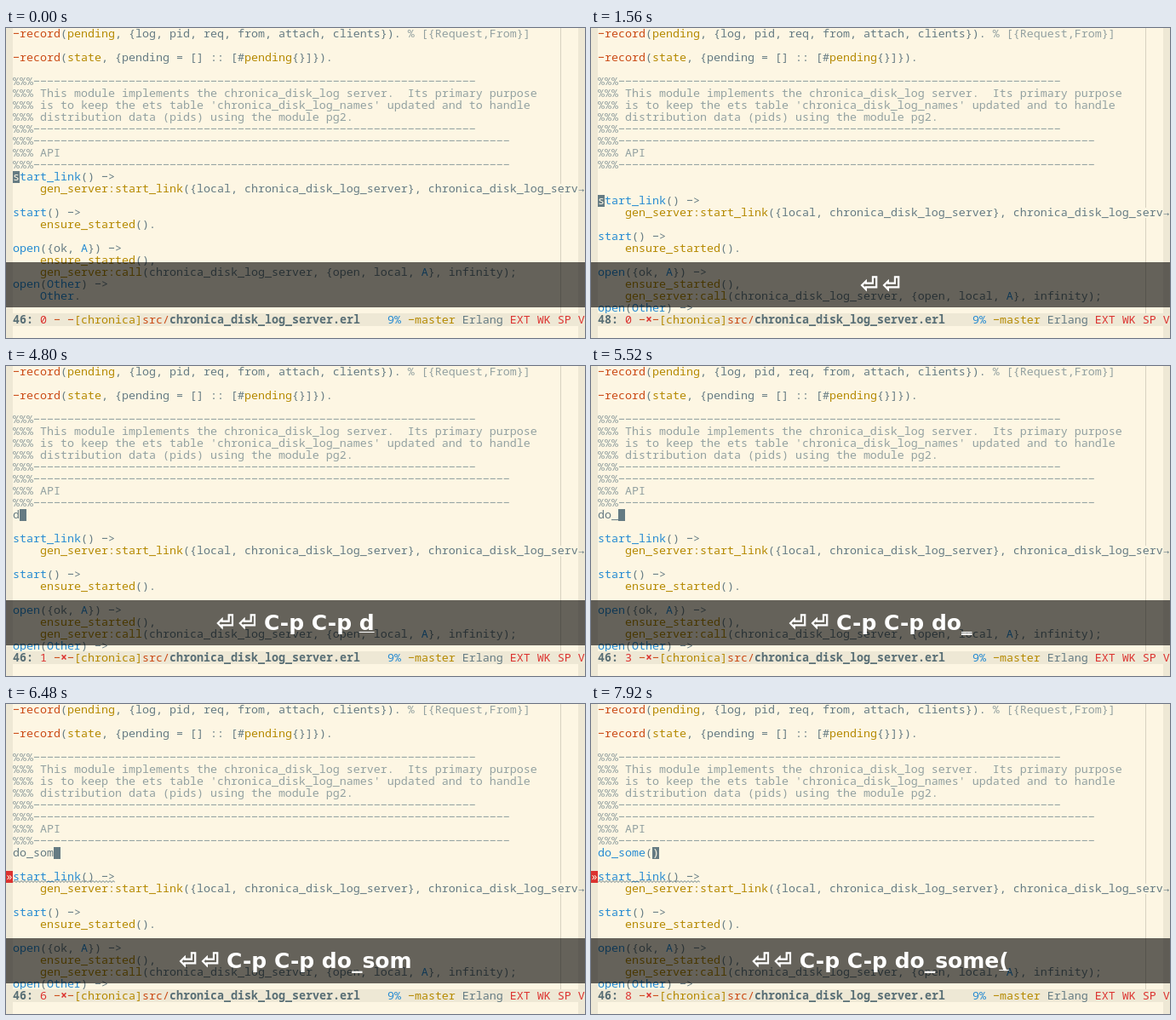
Recreate the animation shown at these times as an HTML page. Size 680 px wide and 364 px high, loop 8 s.

```html
<!DOCTYPE html>
<html lang="en">
<head>
<meta charset="utf-8">
<title>Editor</title>
<style>
html, body { margin: 0; width: 100%; height: 100%; overflow: hidden; background: #fdf6e3; }
#stage { position: relative; width: 680px; height: 364px; overflow: hidden; background: #fdf6e3; color: #657b83; }
#stage > * { position: absolute; margin: 0; }
#stage > pre, #cursor, #mark { font: 13.333px/14px "Noto Sans Mono", monospace; white-space: pre; }
#stage > pre { left: 8px; margin-top: -1px; z-index: 1; }
.fringe { top: 0; width: 8px; height: 364px; background: #eee8d5; }
#rule { left: 651px; top: 0; width: 1px; height: 336px; background: #d8d2c0; }
#head { top: 0; }
#typed { top: 168px; }
.wide { display: inline-block; height: 14px; vertical-align: top; background: linear-gradient(#0000 2px, #fdf6e3 2px); }
#stage > #cursor, #stage > #mark { width: 8px; height: 14px; line-height: 12px; color: #fdf6e3; z-index: 2; }
#cursor { background: #657b83; }
#mark { left: 0; top: 196px; background: #dc322f; }
#wave { left: 8px; top: 206px; z-index: 2; }
#stage > #mode { left: 0; top: 336px; width: 672px; height: 15px; padding-left: 8px; background: #eee8d5; z-index: 3; }
#keys { left: 0; top: 275px; width: 680px; height: 53px; z-index: 4; background: rgba(0, 0, 0, .6); color: #fff;
  font: bold 25px/53px "DejaVu Sans", sans-serif; text-align: center; white-space: pre; }
#keys i { font-style: normal; font-weight: normal; -webkit-text-stroke: 1px #fff; }
#keys u { text-decoration-thickness: 1px; text-underline-offset: 2px; text-decoration-skip-ink: none; }
.c { color: #93a1a1; }
.o { color: #cb4b16; }
.y { color: #b58900; }
.b { color: #268bd2; }
.r { color: #dc322f; }
.f { color: #586e75; }
</style>
</head>
<body>
<div id="stage">
  <div class="fringe" style="left:0"></div>
  <div class="fringe" style="left:672px"></div>
  <div id="rule"></div>
  <pre id="head"></pre>
  <pre id="typed"></pre>
  <pre id="tail"></pre>
  <div id="mark">»</div>
  <svg id="wave" width="120" height="5"><path fill="none" stroke="#657b83"/></svg>
  <div id="cursor"></div>
  <pre id="mode"></pre>
  <div id="keys"></div>
</div>
<script>
const $ = id => document.getElementById(id);

// <x:text> becomes a span of class x; hyphens are drawn as wide as a cell
const paint = s => s.replace(/-/g, '−').replace(/<(\w+):([^>]*)>/g, '<span class="$1">$2</span>');
const dashes = n => `<c:%%%${'-'.repeat(n)}>`;

$('head').innerHTML = paint([
  '<o:-record>(<y:pending>, {log, pid, req, from, attach, clients}). <c:% [{Request,From}]>',
  '',
  '<o:-record>(<y:state>, {pending = [] :: [#<y:pending>{}]}).',
  '',
  dashes(65),
  '<c:%%% This module implements the chronica_disk_log server.  Its primary purpose>',
  "<c:%%% is to keep the ets table 'chronica_disk_log_names' updated and to handle>",
  '<c:%%% distribution data (pids) using the module pg2.>',
  dashes(65),
  dashes(70),
  '<c:%%% API>',
  dashes(70)
].join('\n'));

$('tail').innerHTML = paint([
  '<b:start_link>() -&gt;',
  '<span class="wide">    <y:gen_server:start_link>({local, chronica_disk_log_server}, chronica_disk_log_serv</span>→',
  '',
  '<b:start>() -&gt;',
  '    <y:ensure_started>().',
  '',
  '<b:open>({ok, <b:A>}) -&gt;',
  '    <y:ensure_started>(),',
  '    <y:gen_server:call>(chronica_disk_log_server, {open, local, <b:A>}, infinity);',
  '<b:open>(<b:Other>) -&gt;',
  '    <b:Other>.'
].join('\n'));

$('wave').firstChild.setAttribute('d', 'M0 3.5' + 'l2-2l2 2'.repeat(30));

// time, blank lines added, cursor line, typed text, keys shown, latest key (underlined)
const enter = '⏎\u2009⏎', up = enter + ' C-p C-p', word = up + ' do';
const steps = [
  [0, 0, 46, '', '', ''],
  [1200, 1, 47, '', '', '⏎'],
  [1320, 1, 47, '', '⏎', ''],
  [1440, 2, 48, '', '⏎\u2009', '⏎'],
  [1560, 2, 48, '', enter, ''],
  [2760, 2, 47, '', enter + ' ', 'C-p'],
  [2880, 2, 46, '', enter + ' C-p ', 'C-p'],
  [3120, 2, 46, '', up, ''],
  [4800, 2, 46, 'd', up + ' ', 'd'],
  [4920, 2, 46, 'do', up + ' d', 'o'],
  [5040, 2, 46, 'do', word, ''],
  [5520, 2, 46, 'do_', word, '_'],
  [5760, 2, 46, 'do_', word + '_', ''],
  [6000, 2, 46, 'do_s', word + '_', 's'],
  [6120, 2, 46, 'do_s', word + '_s', ''],
  [6240, 2, 46, 'do_so', word + '_s', 'o'],
  [6360, 2, 46, 'do_som', word + '_so', 'm'],
  [6480, 2, 46, 'do_som', word + '_som', ''],
  [6600, 2, 46, 'do_some', word + '_som', 'e'],
  [6720, 2, 46, 'do_some', word + '_some', ''],
  [7920, 2, 46, 'do_some(', word + '_some', '(']
];

function show([, blanks, line, typed, keys, latest]) {
  const col = typed.length, call = typed.endsWith('(');
  $('typed').innerHTML = call ? paint('<b:do_some>(') : typed;
  $('tail').style.top = 168 + 14 * blanks + 'px';
  const cursor = $('cursor');
  cursor.style.left = 8 + 8 * col + 'px';
  cursor.style.top = 168 + 14 * (line - 46) + 'px';
  cursor.textContent = call ? ')' : line - 46 === blanks ? 's' : '';
  const changed = blanks ? '<b class="r">×</b>' : ' ';
  $('mode').innerHTML = paint(`<b class="f">${line}:</b> <r:${col}> <o:->${changed}<o:->` +
    '<y:[chronica]><o:src/><b class="f">chronica_disk_log_server.erl</b>    <b:9%> <y:-master> Erlang <r:EXT WK SP V>');
  $('keys').innerHTML = (keys + (latest && `<u>${latest}</u>`)).replace(/⏎/g, '<i>⏎</i>');
}

let current;
function tick() {
  const t = performance.now() % 8000;
  const step = steps.findLast(s => s[0] <= t);
  if (step !== current) show(current = step);
  const flagged = t >= 5640;
  $('mark').hidden = !flagged;
  $('wave').style.display = flagged ? '' : 'none';
  requestAnimationFrame(tick);
}
tick();
</script>
</body>
</html>
```
